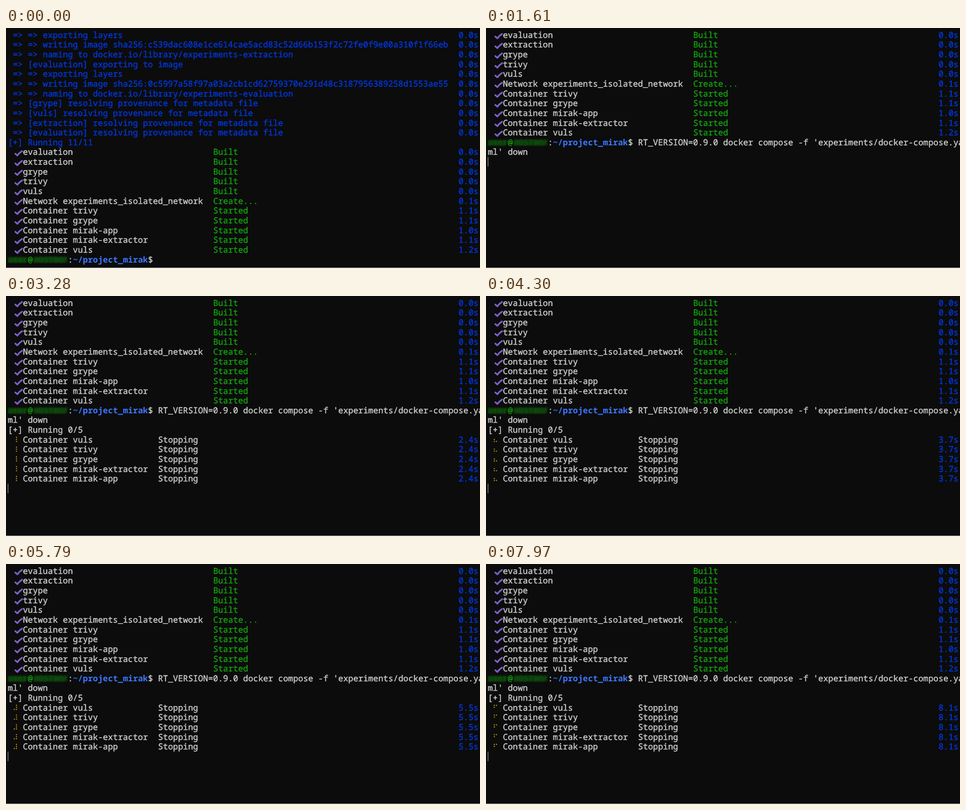
An HTML page that plays this animation: 1053 px wide and 532 px high, repeating every 8000 ms.

```html
<!DOCTYPE html>
<html lang="en">
<head>
<meta charset="utf-8">
<title>Terminal</title>
<style>
html, body { margin: 0; width: 100%; height: 100%; overflow: hidden; background: #0c0c0c; }
svg { display: block; }
text {
  font: 18.54px "Noto Sans Mono", "DejaVu Sans Mono", monospace;
  white-space: pre;
  text-rendering: geometricPrecision;
  font-variant-ligatures: none;
  stroke-width: .45;
}
.bold { font-weight: 700; stroke-width: 0; }
.smudge { filter: blur(1.5px); }
</style>
</head>
<body>
<svg id="stage" width="1053" height="532" viewBox="0 0 1053 532"></svg>
<script>
const LOOP = 8000, SCROLL = 450, PASTE = 1050, ENTER = 1450, RUN = 1710;
const CELL = 11.125, LINE = 21.64, LEFT = 4, TOP = 4.8;
const WHITE = '#cccccc', BLUE = '#0037da', GREEN = '#13a10e', PATH = '#3b78ff',
  YELLOW = '#c19c00', PURPLE = '#7a5fc7';
const SPINNER = '⠋⠙⠹⠸⠼⠴⠦⠧⠇⠏';

const log = `exporting layers
writing image sha256:c539dac608e1ce614cae5acd83c52d66b153f2c72fe0f9e00a310f1f66eb
naming to docker.io/library/experiments-extraction
[evaluation] exporting to image
exporting layers
writing image sha256:0c5997a58f97a03a2cb1cd62759370e291d48c3187956389258d1553ae55
naming to docker.io/library/experiments-evaluation
[grype] resolving provenance for metadata file
[vuls] resolving provenance for metadata file
[extraction] resolving provenance for metadata file
[evaluation] resolving provenance for metadata file`.split('\n');

const done = [
  ...['evaluation', 'extraction', 'grype', 'trivy', 'vuls'].map(n => [n, 'Built', '0.0s']),
  ['Network experiments_isolated_network', 'Create...', '0.1s'],
  ...[['trivy', '1.1s'], ['grype', '1.1s'], ['mirak-app', '1.0s'], ['mirak-extractor', '1.1s'], ['vuls', '1.2s']]
    .map(([n, s]) => ['Container ' + n, 'Started', s])
];
const stopping = ['vuls', 'trivy', 'grype', 'mirak-extractor', 'mirak-app'];

// [time in ms, seconds on the counter]
const pace = [[RUN, .5], [2310, 1.25], [4300, 3.75], [5790, 5.55], [6710, 6.45], [LOOP, 8.19]];

const xOf = col => LEFT + col * CELL;
const yOf = row => TOP + row * LINE;
const put = (row, col, str, color = WHITE, cls = '') =>
  `<text x="${xOf(col)}" y="${yOf(row) + 17}" fill="${color}" stroke="${color}" class="${cls}">${str.replace(/>/g, '&gt;')}</text>`;

const check = row =>
  `<path transform="translate(0 ${yOf(row)})" d="M20.7 14.2L25.3 18Q29.5 12.2 35.6 8.4"
    fill="none" stroke="${PURPLE}" stroke-width="3.8" stroke-linecap="round" stroke-linejoin="round"/>`;

const cursor = (row, col) =>
  `<rect x="${Math.round(xOf(col))}" y="${Math.round(yOf(row))}" width="1" height="21" fill="#c0c0c0"/>`;

// Each braille glyph stores its dots as bits: 0-2 left column, 3-5 right column.
function spinner(row, tenths) {
  const bits = SPINNER.charCodeAt((tenths + 9) % 10) - 0x2800;
  let out = '';
  for (let i = 0; i < 6; i++) {
    if (bits >> i & 1) {
      out += `<circle cx="${i < 3 ? 18.5 : 23.3}" cy="${yOf(row) + 5.6 + i % 3 * 4.5}" r="1.3" fill="${YELLOW}"/>`;
    }
  }
  return out;
}

const blot = (row, x, w, str) =>
  `<g class="smudge" transform="translate(0 ${yOf(row)})">
    <path d="M${x + 2} 5H${x + w}L${x + w - 3} 18H${x}Z" fill="#0c390b"/>
    <text x="${x}" y="17" fill="#10700d" opacity=".45" class="bold">${str}</text></g>`;

const prompt = row =>
  blot(row, 4, 43, 'user') + put(row, 4, '@', GREEN, 'bold') + blot(row, 61, 74, 'HOSTBOX')
  + put(row, 12, ':') + put(row, 13, '~/project_mirak', PATH, 'bold') + put(row, 28, '$');

const results = top => done.map(([name, state, secs], i) =>
  check(top + i) + put(top + i, 3, name) + put(top + i, 41, state, GREEN) + put(top + i, 90, secs, BLUE)).join('');

const before = log.map((line, row) =>
  put(row, 1, (line[0] === '[' ? '=> ' : '=> => ') + line, BLUE) + put(row, 90, '0.0s', BLUE)).join('')
  + put(11, 0, '[+] Running 11/11', BLUE) + results(12) + prompt(23);
const after = results(0) + prompt(11);
const command = put(11, 30, "RT_VERSION=0.9.0 docker compose -f 'experiments/docker-compose.ya")
  + put(12, 0, "ml' down");
const edge = '<rect y="531" width="1053" height="1" fill="#8f97a3"/>';

function tenthsAt(t) {
  const i = pace.findIndex(([end]) => t < end);
  const [t0, s0] = pace[i - 1], [t1, s1] = pace[i];
  return Math.floor(10 * (s0 + (s1 - s0) * (t - t0) / (t1 - t0)));
}

const running = tenths => put(13, 0, '[+] Running 0/5') + stopping.map((name, i) =>
  spinner(14 + i, tenths) + put(14 + i, 3, 'Container ' + name) + put(14 + i, 30, 'Stopping')
  + put(14 + i, 90, (tenths / 10).toFixed(1) + 's', BLUE)).join('') + cursor(19, 0);

function screen(t) {
  if (t < SCROLL) return before;
  if (t < PASTE) return after + cursor(11, 30);
  if (t < ENTER) return after + command + cursor(12, 8);
  if (t < RUN) return after + command + cursor(13, 0);
  return after + command + running(tenthsAt(t));
}

const stage = document.getElementById('stage');
let shown = '';
function draw() {
  const next = screen(performance.now() % LOOP) + edge;
  if (next !== shown) stage.innerHTML = shown = next;
  requestAnimationFrame(draw);
}
draw();
</script>
</body>
</html>
```
